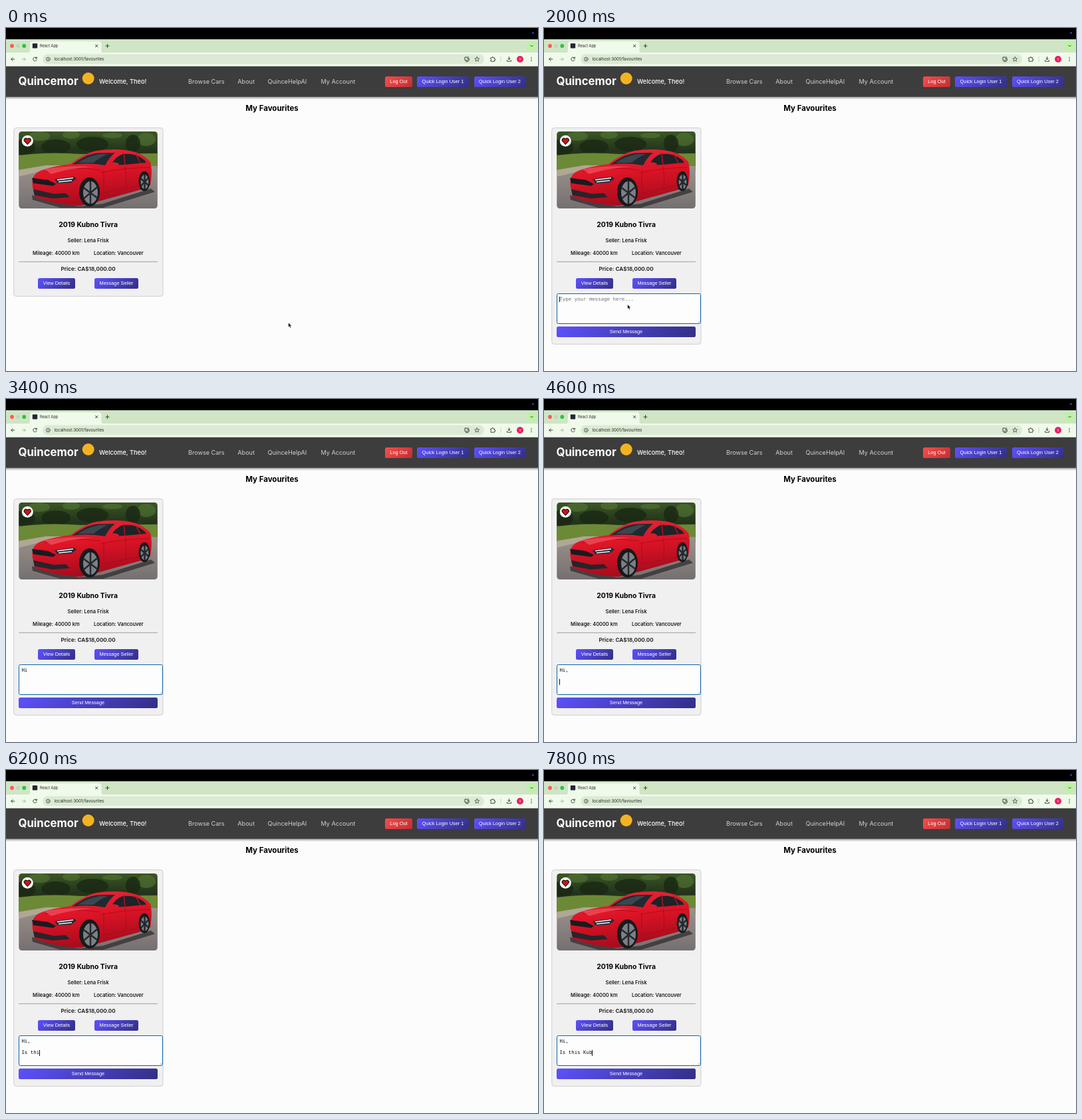
Write an HTML page that moves like this. It is 800 by 517 pixels and loops after 8000 ms.

```html
<!DOCTYPE html>
<html lang="en">
<head>
<meta charset="utf-8">
<title>My Favourites</title>
<style>
  html, body { margin: 0; width: 100%; height: 100%; overflow: hidden; background: #fcfcfc; }
  #stage { position: relative; width: 800px; height: 517px; overflow: hidden; background: #fcfcfc; }
  #stage > * { position: absolute; box-sizing: border-box; }
  svg { left: 0; top: 0; display: block; }
  text { font-family: Inter, sans-serif; }
  .nav { font-size: 9.1px; fill: #d0d0d0; }
  .mid { text-anchor: middle; }
  .semi { font-weight: 600; }
  .bold { font-weight: 700; }
  .med { font-weight: 500; font-size: 7.6px; }
  .icon { fill: none; stroke: #26331f; stroke-width: .9; stroke-linecap: round; stroke-linejoin: round; }
  .btn { height: 16px; border-radius: 2.5px; color: #fff; text-align: center;
    font: 7.4px/15.6px "Liberation Sans", sans-serif;
    background: linear-gradient(135deg, #5d51fb, #322f86); }
  .btn.red { background: linear-gradient(135deg, #f84c4c, #c22f31); }
  .btn.hover { transform: translateY(-1px); box-shadow: 0 2px 6px #5a50e880;
    background: linear-gradient(135deg, #483dd6, #28256f); }
  #box { left: 19px; top: 400px; width: 217px; height: 46px; background: #fdfdfd;
    border: 1px solid #cbcbcd; border-radius: 2.5px; }
  #box.focus { border: 1.6px solid #0d62ae; }
  #typed { left: 23.4px; top: 404.6px; margin: 0; font: 7.4px/8.8px "DejaVu Sans Mono", monospace; color: #111; }
  #typed.hint { color: #757575; }
  #caret { width: .8px; height: 8.6px; background: #111; }
</style>
</head>
<body>
<div id="stage">
  <svg width="800" height="517" viewBox="0 0 800 517">
    <defs>
      <linearGradient id="trees" x2="0" y2="1">
        <stop offset="0" stop-color="#3b5626"/><stop offset=".5" stop-color="#22331a"/><stop offset="1" stop-color="#43602a"/>
      </linearGradient>
      <linearGradient id="road" x2="0" y2="1">
        <stop offset="0" stop-color="#9b928b"/><stop offset="1" stop-color="#746f70"/>
      </linearGradient>
      <linearGradient id="paint" x2=".25" y2="1">
        <stop offset="0" stop-color="#e72a3b"/><stop offset=".5" stop-color="#dc1426"/><stop offset="1" stop-color="#a90c1d"/>
      </linearGradient>
      <linearGradient id="shade" x2="0" y2="1">
        <stop offset="0" stop-color="#555" stop-opacity=".75"/><stop offset="1" stop-color="#888" stop-opacity="0"/>
      </linearGradient>
      <clipPath id="photo"><rect x="19.3" y="156" width="208.5" height="116" rx="4.5"/></clipPath>
    </defs>

    <!-- browser chrome -->
    <rect width="800" height="17"/>
    <circle cx="792.5" cy="7.5" r="1.4" fill="#4438c8"/>
    <rect y="17" width="800" height="21" fill="#cfe5c5"/>
    <path d="M32 37.5Q36 37.5 36 33.5V24Q36 20 40 20H139.5Q143.5 20 143.5 24V33.5Q143.5 37.5 147.5 37.5Z" fill="#f0faeb"/>
    <rect y="37" width="800" height="21" fill="#f0faeb"/>
    <rect x="55" y="39.5" width="664" height="14.8" rx="7.4" fill="#dcead5"/>
    <circle cx="9" cy="27" r="2.9" fill="#fb5b55"/>
    <circle cx="18" cy="27" r="2.9" fill="#c5d4be"/>
    <circle cx="27.3" cy="27" r="2.9" fill="#2ac440"/>
    <rect x="39.8" y="23.2" width="7.4" height="7.4" rx="1" fill="#23272f"/>
    <text x="51" y="29.1" font-size="5.6" fill="#222">React App</text>
    <rect x="783" y="20.5" width="15" height="13" rx="4" fill="#bdf2a5"/>
    <g class="icon">
      <path d="M134.5 25.2l3.5 3.5m0-3.5l-3.5 3.5M150 27h5m-2.500-2.500v5M788.800 26.200l1.800 1.800 1.800-1.800"/>
      <path d="M12.800 47H7.800m2.300-2.400L7.700 47l2.400 2.400"/>
      <path d="M24.300 47h5m-2.300-2.400L29.400 47 27 49.400" stroke="#a5b09f"/>
      <path d="M46 45.400a2.800 2.800 0 1 0 .3 2.400M46.300 43.800v1.900h-1.900"/>
      <circle cx="63.3" cy="47" r="2.9" stroke-width=".7"/><path d="M63.300 46.800v1.500m0-3v.1"/>
      <path d="M693.500 44h-3.500v4.700h6.500v-1.500M691.500 50.500h3.500M695 43.500v3.200m-1.300-1.200l1.300 1.300 1.300-1.300"/>
      <path d="M708.300 43.500l1 2.300 2.500.2-1.900 1.600.6 2.500-2.200-1.300-2.200 1.300.6-2.500-1.900-1.600 2.500-.2z" stroke-width=".7"/>
      <path d="M729 45h1.900v-.6a.9.900 0 0 1 1.800 0v.6h1.900v1.900h.5a.9.900 0 0 1 0 1.800h-.5v1.500h-5.600v-1.600a1 1 0 0 0 0-1.900z"/>
      <path d="M756.500 43.500v4m-1.800-1.700l1.800 1.800 1.800-1.800M753.500 48.500v1.700h6v-1.700"/>
    </g>
    <path d="M744 43v8" stroke="#bddcae"/>
    <text x="72.5" y="49.3" font-size="6.3" fill="#222c1f">localhost:3001/favourites</text>
    <circle cx="773" cy="47" r="5" fill="#ea1f63"/>
    <text class="mid" x="773" y="48.7" font-size="4.5" fill="#fff">V</text>
    <g fill="#26331f"><circle cx="790" cy="44.5" r=".7"/><circle cx="790" cy="47" r=".7"/><circle cx="790" cy="49.5" r=".7"/></g>

    <!-- site header -->
    <rect y="103" width="800" height="5" fill="url(#shade)"/>
    <rect y="57.7" width="800" height="46" fill="#3d3d3d"/>
    <text class="bold" x="18.5" y="86.2" font-size="16.7" fill="#fff">Quincemor</text>
    <circle cx="123.7" cy="76" r="9" fill="#f3b321"/>
    <text x="140" y="83.8" font-size="9.2" font-weight="500" fill="#fff">Welcome, Theo!</text>
    <g class="nav">
      <text x="274" y="83.8">Browse Cars</text>
      <text x="348.3" y="83.8">About</text>
      <text x="393.5" y="83.8">QuinceHelpAI</text>
      <text x="473.5" y="83.8">My Account</text>
    </g>
    <text class="mid bold" x="400" y="125" font-size="11.5">My Favourites</text>

    <rect id="card" x="11.7" y="150.400" width="224.300" height="254" rx="4" fill="#f0f0f0" stroke="#c4c4c6" stroke-width=".8"/>

    <!-- car photo -->
    <g clip-path="url(#photo)">
      <rect x="19" y="156" width="210" height="60" fill="url(#trees)"/>
      <g fill="#547735" opacity=".6">
        <ellipse cx="50" cy="163" rx="16" ry="7"/><ellipse cx="98" cy="161" rx="13" ry="6"/>
        <ellipse cx="211" cy="168" rx="14" ry="10"/><ellipse cx="160" cy="162" rx="15" ry="4"/>
      </g>
      <g fill="#1b2914" opacity=".8">
        <ellipse cx="27" cy="180" rx="17" ry="12"/><ellipse cx="75" cy="179" rx="22" ry="11"/>
        <ellipse cx="130" cy="175" rx="24" ry="11"/><ellipse cx="191" cy="174" rx="11" ry="13"/>
      </g>
      <path d="M19 192Q65 186 112 190L228 189V216H19Z" fill="#6c8936"/>
      <path d="M19 214L65 207 228 208V273H19Z" fill="url(#road)"/>
      <path d="M19 214L60 207H90L19 224Z" fill="#b0a795"/>
      <path d="M39 252L110 269 145 265 218 242 224 247 146 271H82L40 259Z" fill="#302e31" opacity=".75"/>
      <path d="M40 239C38 227 42 219 52 215C68 209 84 207 97 205C110 195 122 188 136 185C154 182 178 182 194 187C206 191 213 197 217 202C220 212 219 225 217 237L205 243 140 261 112 268C90 267 60 262 43 254Z" fill="url(#paint)"/>
      <path d="M99 206C113 196 124 190 138 188.500L164 188Q155 195 149 207Q122 202 99 206Z" fill="#202a30"/>
      <path d="M108 203Q123 193 141 190L153 190Q139 196 132 203Z" fill="#4c5b64" opacity=".6"/>
      <path d="M157 207Q165 193 176 190Q195 188 208 199L211 203 178 206Z" fill="#1b2428"/>
      <path d="M177 188L179 207M195 190L202 204" stroke="#b71120" stroke-width="1.500"/>
      <ellipse cx="161" cy="205.500" rx="9" ry="3.300" fill="#d61b2c"/>
      <path d="M58 217Q94 207 142 214M143 218Q178 211 216 210M145 249L199 238M179 209Q182 224 180 241M147 215V245" fill="none" stroke="#a40c1c" stroke-width=".8"/>
      <path d="M58 213Q88 207 130 209Q96 211 68 220Z" fill="#f45a64" opacity=".65"/>
      <path d="M39 226L63 229 75 235 71 238 41 234Z" fill="#181b20"/>
      <path d="M41 243L72 250 90 249 96 255 70 257 43 252Z" fill="#24262b"/>
      <path d="M73 228L102 224 106 227 98 233 77 234Z" fill="#222d36"/>
      <path d="M77 229L101 226M79 232L99 230" stroke="#edf6fb" stroke-width="1.700"/>
      <ellipse cx="125.500" cy="247" rx="15.500" ry="22" fill="#17191d"/>
      <ellipse cx="127" cy="248" rx="11" ry="17" fill="#7b8085"/>
      <ellipse cx="208" cy="231" rx="8.500" ry="15" fill="#17191d"/>
      <ellipse cx="208.500" cy="232" rx="6" ry="11" fill="#7b8085"/>
      <path d="M127 231V265M117 241L137 256M117 257L137 240M208.500 221V243M203 227L214 237M203 238L214 226" stroke="#25282c" stroke-width="2.500"/>
    </g>
    <circle cx="32.300" cy="170.300" r="8.500" fill="#fff"/>
    <path d="M32.300 175.300L28 170.900C25.500 168 29.500 164 32.300 167.400C35.100 164 39.100 168 36.600 170.900Z" fill="#d51013" stroke="#171010" stroke-width="1.100" stroke-linejoin="round"/>

    <!-- card details -->
    <g class="mid">
      <text class="bold" x="123.600" y="300.300" font-size="10.400">2019 Kubno Tivra</text>
      <text class="med" x="123.600" y="323.300">Seller: Lena Frisk</text>
      <text class="med" x="75.400" y="341.600">Mileage: 40000 km</text>
      <text class="med" x="169.300" y="341.600">Location: Vancouver</text>
      <text class="semi" x="123.600" y="365.600" font-size="8.200" fill="#161616">Price: CA$18,000.00</text>
    </g>
    <path d="M19.300 352.300H228" stroke="#949494" stroke-width=".9"/>
  </svg>

  <div class="btn red" style="left:570px;top:72.600px;width:41px">Log Out</div>
  <div class="btn" style="left:618px;top:72.600px;width:78px">Quick Login User 1</div>
  <div class="btn" style="left:703.500px;top:72.600px;width:78px">Quick Login User 2</div>
  <div class="btn" style="left:48px;top:377px;width:56px">View Details</div>
  <div class="btn" id="message" style="left:133px;top:377px;width:66px">Message Seller</div>

  <div class="panel" id="box"></div>
  <pre class="panel" id="typed"></pre>
  <div class="panel" id="caret"></div>
  <svg class="panel" width="800" height="517"><path d="M231.500 444.300l3-3m-1 3l1-1" stroke="#777" stroke-width=".6"/></svg>
  <div class="btn panel" style="left:19px;top:449.600px;width:209px">Send Message</div>

  <svg id="pointer" width="10" height="12" viewBox="-1 -1 10 12">
    <path d="M0 0V7.200L1.700 5.700 2.900 8.300 4.200 7.700 3 5.200H5.300Z" fill="#000" stroke="#fff" stroke-width=".7" stroke-linejoin="round"/>
  </svg>
</div>

<script>
const LOOP = 8000, STEP = 200;
const OPEN = 800, FOCUS = 1800, HOVER = [600, 1400];
const HINT = "Type your message here...";
const CHAR = 4.455, LINE = 8.8;

// time, x, y of the pointer tip
const path = [
  [0, 424.5, 444], [200, 400, 436], [400, 270, 404], [600, 182, 383],
  [800, 175.5, 381], [1400, 168, 389], [1600, 138, 411], [1800, 125.5, 416.5]
];
const message = "Hi,\n\nIs this Kub";
const keys = [2600, 2800, 3800, 4200, 4400, 5000, 5200, 5400, 5600, 5800, 6200,
  6400, 6600, 7200, 7400, 7800];

const el = id => document.getElementById(id);
const panel = document.querySelectorAll(".panel");
const show = (node, on) => node.style.visibility = on ? "visible" : "hidden";

function draw(t) {
  const open = t >= OPEN, focus = t >= FOCUS;
  const count = keys.filter(k => k <= t).length;
  const text = message.slice(0, count);

  el("card").setAttribute("height", open ? 326.2 : 254);
  panel.forEach(node => show(node, open));
  el("box").classList.toggle("focus", focus);
  el("message").classList.toggle("hover", t >= HOVER[0] && t < HOVER[1]);

  el("typed").textContent = text || HINT;
  el("typed").classList.toggle("hint", !count);

  const lines = text.split("\n");
  const lastKey = count ? keys[count - 1] : FOCUS;
  el("caret").style.left = 23.4 + lines.at(-1).length * CHAR + "px";
  el("caret").style.top = 404.6 + (lines.length - 1) * LINE + "px";
  show(el("caret"), focus && Math.floor((t - lastKey) / 500) % 2 === 0);

  const [, x, y] = path.findLast(p => p[0] <= t);
  el("pointer").style.transform = `translate(${x - 1}px, ${y - 1}px)`;
  show(el("pointer"), !count);
}

const start = performance.now();
function tick() {
  const t = (performance.now() - start) % LOOP;
  draw(Math.floor(t / STEP) * STEP);
  requestAnimationFrame(tick);
}
tick();
</script>
</body>
</html>
```
